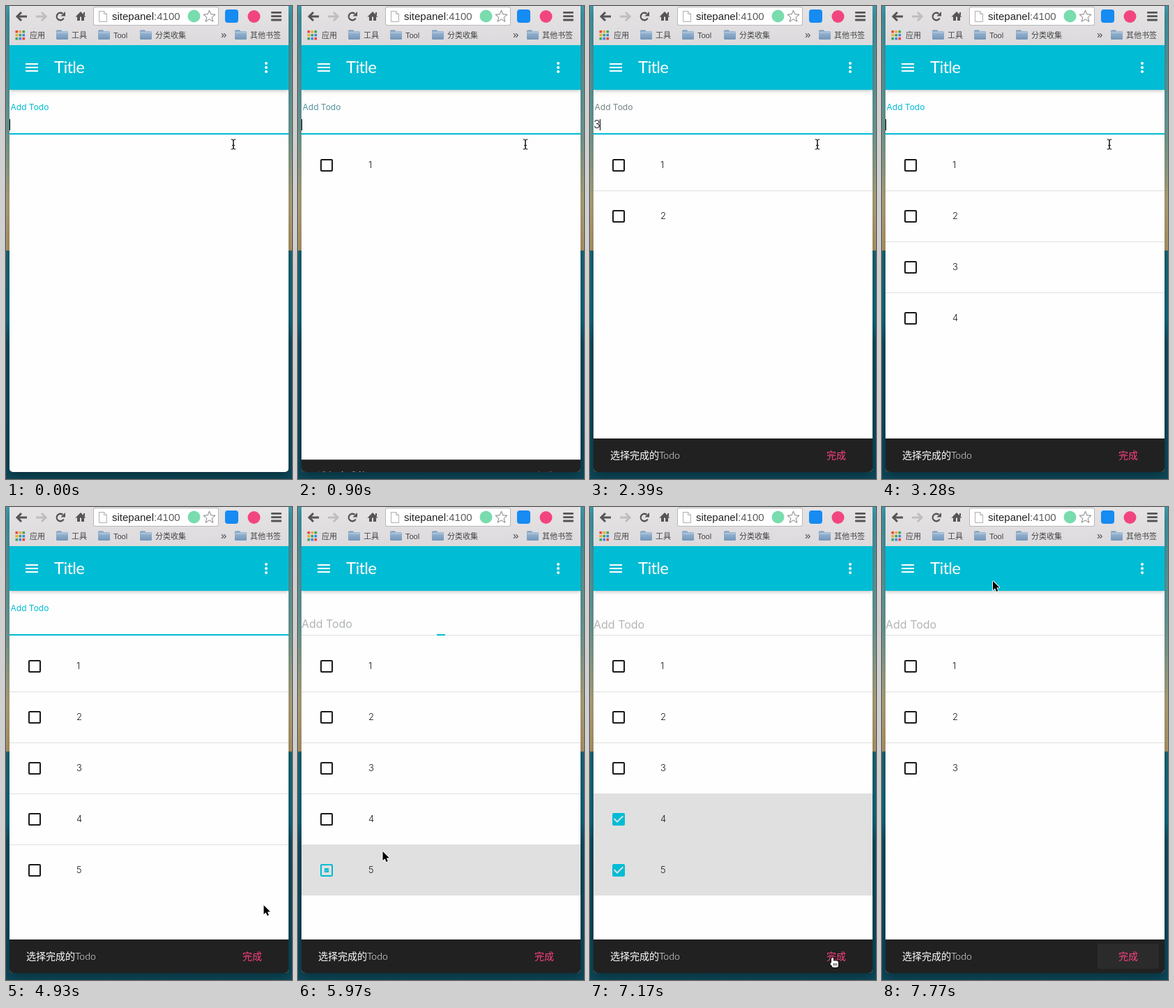
Animation, 410 px wide and 677 px high, one loop 8 s. Source, as an HTML page with a canvas:

```html
<!DOCTYPE html>
<html lang="zh">
<head>
<meta charset="utf-8">
<title>Todo</title>
<style>
html, body { margin: 0; width: 100%; height: 100%; overflow: hidden; background: #0c4759; }
canvas { display: block; width: 410px; height: 677px; }
</style>
</head>
<body>
<canvas id="stage" width="410" height="677"></canvas>
<script>
const ctx = document.getElementById('stage').getContext('2d');
const LOOP = 8000, TICK = 149.45, LAST_TICK = 52;
const CYAN = [0, 188, 212], TYPED_GRAY = [127, 127, 127], HINT = [181, 181, 181];
const CYAN_CSS = '#00bcd4', LINE = '#e0e0e0', INK = '#1a1a1a', GRAY = '#555';
const GEO = 'Inter, sans-serif';
const SANS = '"Liberation Sans", "Noto Sans CJK SC", "Noto Sans CJK", sans-serif';
const SNACK = 'Lato, "Noto Sans CJK SC", "Noto Sans CJK", sans-serif';

// Script of the session, in ms
const TODOS = [
  { typed: 430, added: 860 },
  { typed: 1370, added: 1900 },
  { typed: 2220, added: 2500 },
  { typed: 2800, added: 2960, removed: 7300, checked: 6370 },
  { typed: 3400, added: 3560, removed: 7300, checked: 5912 },
];
const BLUR = 5745, DONE = 7300, BLINK = 450, POINTER_MOVES = 4250;
const POINTER_PATH = [
  { t: POINTER_MOVES, x: 326, y: 198 },
  { t: 4900, x: 369, y: 569 },
  { t: 5200, x: 369, y: 569 },
  { t: 5440, x: 318, y: 639 },
  { t: 5820, x: 121, y: 492 },
  { t: 6050, x: 121, y: 492 },
  { t: 6380, x: 121, y: 452 },
  { t: 7100, x: 349, y: 644 },
  { t: 7330, x: 349, y: 644 },
  { t: 7750, x: 158.5, y: 105 },
];

const clamp = x => Math.max(0, Math.min(1, x));
const mix = (a, b, k) => a + (b - a) * k;
const mixColor = (a, b, k) => `rgb(${a.map((v, i) => Math.round(mix(v, b[i], k))).join()})`;

// cubic-bezier(.23, 1, .32, 1)
function easeOut(x) {
  if (x <= 0) return 0;
  if (x >= 1) return 1;
  let lo = 0, hi = 1;
  for (let i = 0; i < 20; i++) {
    const u = (lo + hi) / 2, v = 1 - u;
    if (.69 * u * v * v + .96 * u * u * v + u ** 3 < x) lo = u; else hi = u;
  }
  return 1 - (1 - lo) ** 3;
}

function rect(x, y, w, h, fill, r = 0) {
  ctx.fillStyle = fill;
  ctx.beginPath();
  ctx.roundRect(x, y, w, h, r);
  ctx.fill();
}
function dot(x, y, r, fill) {
  ctx.fillStyle = fill;
  ctx.beginPath();
  ctx.arc(x, y, r, 0, 7);
  ctx.fill();
}
function trace(pts) {
  ctx.beginPath();
  pts.forEach(([x, y]) => ctx.lineTo(x, y));
}
function poly(pts, fill) {
  trace(pts);
  ctx.closePath();
  ctx.fillStyle = fill;
  ctx.fill();
}
function stroke(pts, color, width) {
  trace(pts);
  ctx.strokeStyle = color;
  ctx.lineWidth = width;
  ctx.stroke();
}
function text(s, x, y, font, fill, spacing = 0) {
  ctx.font = font;
  ctx.letterSpacing = spacing + 'px';
  ctx.fillStyle = fill;
  ctx.fillText(s, x, y);
}
function gradient(y0, y1, ...stops) {
  const g = ctx.createLinearGradient(0, y0, 0, y1);
  stops.forEach(([at, c]) => g.addColorStop(at, c));
  return g;
}
function shadow(color, blur, dy) {
  ctx.shadowColor = color;
  ctx.shadowBlur = blur;
  ctx.shadowOffsetY = dy;
}

function desktop() {
  rect(0, 0, 410, 350, gradient(0, 350, [0, '#3f9fb0'], [.5, '#74a8a2'], [.8, '#c0b283'], [1, '#bea16c']));
  rect(0, 350, 410, 327, gradient(350, 677, [0, '#1c6c7b'], [.3, '#0b6d84'], [.4, '#0d5064'], [1, '#0d4a5c']));
  ctx.save();
  shadow('rgba(0,0,0,.4)', 16, 5);
  rect(5, 0, 400, 667, '#fefefe', [0, 0, 5, 5]);
  ctx.restore();
}

function folder(x) {
  rect(x, 34.5, 8, 4, '#7798b8', 1.5);
  rect(x, 36, 17, 12, gradient(36, 48, [0, '#9db9d4'], [1, '#7396b9']), 1.5);
  rect(x + 1, 37.5, 15, 1, '#b9cfe2');
}

function arrowButton(tip, dir, color) {
  stroke([[tip, 15], [tip + 14 * dir, 15]], color, 3);
  stroke([[tip + 6 * dir, 9], [tip, 15], [tip + 6 * dir, 21]], color, 3);
}

function navButtons() {
  arrowButton(16, 1, GRAY);
  arrowButton(57, -1, '#bfbdbe');
  ctx.beginPath();
  ctx.arc(78, 15, 5.3, .5, 5.4);
  ctx.strokeStyle = GRAY;
  ctx.lineWidth = 2.4;
  ctx.stroke();
  poly([[85, 8], [85, 14.5], [78.5, 14.5]], GRAY);
  poly([[107, 8], [114.5, 15.5], [99.5, 15.5]], GRAY);
  [102, 108].forEach(x => rect(x, 14, 4, 7, GRAY));
  rect(111, 9, 2, 4, GRAY);
}

function addressBar() {
  rect(125, 1, 180, 27, '#b9b7b8', 3);
  rect(126, 2, 178, 25, '#fff', 2);
  stroke([[133.5, 7.5], [140.5, 7.5], [144.5, 11.5], [144.5, 22.5], [133.5, 22.5], [133.5, 7]], '#b0b0b0', 1);
  stroke([[140.5, 7.5], [140.5, 11.5], [144.5, 11.5]], '#b0b0b0', 1);
  text('sitepanel', 152, 20, '15px ' + SANS, '#222');
  text(':4100', 152 + ctx.measureText('sitepanel').width, 20, '15px ' + SANS, '#5c5c5c');
  dot(269.5, 14.5, 9, '#79dcae');
  const star = Array.from({ length: 11 }, (_, i) => {
    const a = i * Math.PI / 5 - Math.PI / 2, r = i % 2 ? 3.9 : 9;
    return [291.5 + r * Math.cos(a), 15 + r * Math.sin(a)];
  });
  stroke(star, '#808080', 1);
}

function toolbar() {
  rect(5, 0, 400, 56, gradient(0, 56, [0, '#e5e3e4'], [1, '#dcdadc']));
  navButtons();
  addressBar();
  rect(314, 5, 19, 19, '#168bf2', 4);
  dot(355.5, 15, 9, '#f2457f');
  for (let i = 0; i < 3; i++) rect(380, 8 + 5.3 * i, 15, 2.8, GRAY, 1);

  const palette = ['#e8473c', '#f2a92e', '#3fa45b', '#4285e0'];
  for (let row = 0; row < 3; row++)
    for (let col = 0; col < 3; col++)
      rect(13.5 + col * 5, 35 + row * 5, 3.6, 3.6, palette[(row + col) % 4], .6);
  text('应用', 34, 46, '11px ' + SANS, '#444');
  [['工具', 72], ['Tool', 132], ['分类收集', 192], ['其他书签', 328]].forEach(([name, x]) => {
    folder(x);
    text(name, x + 22, 46, '11px ' + SANS, '#444');
  });
  text('»', 308, 46, '15px ' + SANS, '#444');
}

function appBar() {
  ctx.save();
  [6, 4].forEach(blur => {
    shadow('rgba(0,0,0,.14)', blur, 1);
    rect(5, 56, 400, 64, CYAN_CSS);
  });
  ctx.restore();
  for (let i = 0; i < 3; i++) {
    rect(28, 82 + 5 * i, 18, 2, '#fff');
    dot(373, 82 + 6 * i, 2, '#fff');
  }
  text('Title', 69, 96, '24px Lato, sans-serif', '#fff', -.7);
}

function field(t) {
  const typing = TODOS.findIndex(todo => t >= todo.typed && t < todo.added);
  const edits = TODOS.flatMap(todo => [todo.typed, todo.added]).filter(e => e <= t);
  const sinceEdit = t - Math.max(-400, ...edits);
  const settled = edits.length ? easeOut(sinceEdit / 450) : 1;
  const gray = typing < 0 ? 1 - settled : settled;

  const blurred = easeOut((t - BLUR) / 450), float = 1 - blurred;
  const scale = 1 - .25 * float;
  ctx.save();
  ctx.translate(5 + 2 * float * scale, 157.5 - 28 * float * scale);
  ctx.scale(scale, scale);
  text('Add Todo', 0, 16.7, '16px ' + GEO, blurred ? mixColor(CYAN, HINT, blurred) : mixColor(CYAN, TYPED_GRAY, gray));
  ctx.restore();

  if (typing >= 0) text(String(typing + 1), 5, 175, '300 16px ' + GEO, INK);
  const caretOn = t < BLUR && Math.floor(sinceEdit / BLINK) % 2 === 0;
  if (caretOn) rect(typing < 0 ? 5 : 14, 162, 1, 16, '#000');
  rect(5, 183, 400, 1, LINE);
  rect(205 - 200 * float, 182, 400 * float, 2, CYAN_CSS);
}

function checkbox(x, y, elapsed) {
  const on = elapsed >= 0, grow = easeOut(elapsed / 800);
  ctx.save();
  ctx.translate(x, y);
  ctx.globalAlpha = on ? 1 - easeOut((elapsed - 150) / 650) : 1;
  ctx.strokeStyle = on ? CYAN_CSS : INK;
  ctx.lineWidth = 2;
  ctx.beginPath();
  ctx.roundRect(-8, -8, 16, 16, 1);
  ctx.stroke();
  ctx.globalAlpha = 1;
  if (grow > 0) {
    ctx.scale(grow, grow);
    rect(-9, -9, 18, 18, CYAN_CSS, 2);
    stroke([[-6.3, -.7], [-2, 3.6], [6.3, -4.7]], LINE, 2);
  }
  ctx.restore();
}

function list(t) {
  const rows = TODOS.filter(todo => t >= todo.added && !(t >= todo.removed));
  rows.forEach((todo, i) => {
    const y = 228 + 73 * i, elapsed = t - (todo.checked || Infinity);
    if (elapsed >= 0) rect(5, y - 37, 400, 73, LINE);
    if (i < rows.length - 1) rect(5, y + 36, 400, 1, LINE);
    checkbox(41, y, elapsed);
    text(String(i + 1), 101, y + 3.5, '300 13px ' + GEO, INK);
  });
}

function snackbar(t) {
  const y = 667 - 48 * easeOut((t - TODOS[0].added) / 400);
  rect(5, y, 400, 48, '#212121');
  if (t >= DONE) rect(309, y + 6, 88, 36, '#2b2b2b', 2);
  text('选择完成的Todo', 29, y + 29, '300 14px ' + SNACK, '#fff');
  text('完成', 339, y + 29, '14px ' + SNACK, '#ff4081');
}

function beam() {
  [['#fff', 2.4], ['#222', 1.1]].forEach(([color, width]) => {
    [-1, 1].forEach(s =>
      stroke([[3.5 * s, -7], [1.5 * s, -7], [0, -5.5], [0, 5.5], [1.5 * s, 7], [3.5 * s, 7]], color, width));
    stroke([[-2, 1.5], [2, 1.5]], color, width);
  });
}

function arrow() {
  const shape = [[.5, 1], [.5, 14], [3.5, 11.2], [5.6, 16], [7.8, 15], [5.8, 10.4], [9.8, 10.2], [.5, 1]];
  stroke(shape, '#fff', 1.8);
  poly(shape, '#000');
}

function hand() {
  const shape = grow => {
    const fill = grow ? '#000' : '#fff';
    const part = (x, y, w, h, r) => rect(x - grow, y - grow, w + 2 * grow, h + 2 * grow, fill, r + grow);
    part(-3, 1, 3.2, 11, 1.5);
    part(-4.5, 8, 4, 4, 2);
    part(-2.5, 5.5, 9.5, 9.5, 3);
  };
  shape(.8);
  shape(0);
  for (let i = 0; i < 3; i++) rect(.2 + 2.1 * i, 9, .8, 3.5, '#000');
}

function pointer(t) {
  const next = POINTER_PATH.findIndex(p => p.t > t);
  const b = POINTER_PATH.at(next), a = next > 0 ? POINTER_PATH[next - 1] : b;
  const k = a === b ? 0 : clamp((t - a.t) / (b.t - a.t)), smooth = k * k * (3 - 2 * k);
  const x = mix(a.x, b.x, smooth), y = mix(a.y, b.y, smooth);
  ctx.save();
  ctx.translate(x, y);
  ctx.lineJoin = 'round';
  if (t < POINTER_MOVES) beam();
  else if (x > 309 && y > 625) hand();
  else arrow();
  ctx.restore();
}

function draw(now) {
  const t = TICK * Math.min(LAST_TICK, Math.floor((now % LOOP + 10) / TICK));
  desktop();
  ctx.save();
  ctx.beginPath();
  ctx.roundRect(5, 0, 400, 667, [0, 0, 5, 5]);
  ctx.clip();
  appBar();
  toolbar();
  field(t);
  list(t);
  snackbar(t);
  ctx.restore();
  pointer(t);
}

const start = performance.now();
function loop() {
  draw(performance.now() - start);
  requestAnimationFrame(loop);
}
loop();
</script>
</body>
</html>
```
